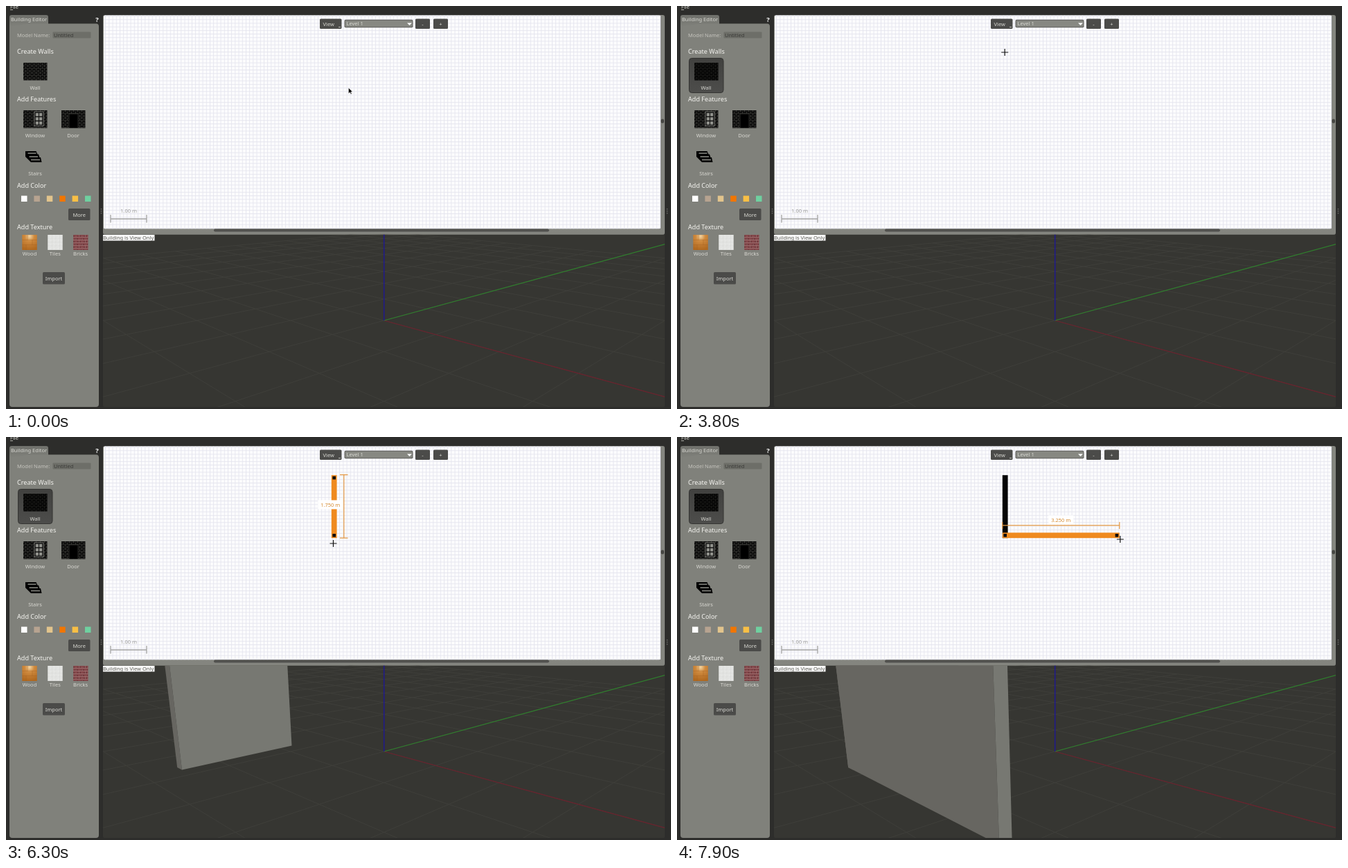
Write an HTML page that moves like this. It is 960x583 px and loops after 8 s.

```html
<!DOCTYPE html>
<html lang="en">
<head>
<meta charset="utf-8">
<title>Building Editor</title>
<style>
html, body { margin: 0; width: 100%; height: 100%; overflow: hidden; background: #2d2d2b; }
svg { display: block; width: 960px; height: 583px; }
text { font: 7.5px "Noto Sans", "Open Sans", sans-serif; fill: #d9d9d3; }
.head { font-size: 9.1px; fill: #f4f4f0; }
.mid { text-anchor: middle; }
.dim { fill: #d68c33; text-anchor: middle; }
.dimline { stroke: #e59a45; stroke-width: 1.2; fill: none; }
</style>
</head>
<body>
<svg viewBox="0 0 960 583">
  <defs>
    <pattern id="brick" width="6" height="5" patternUnits="userSpaceOnUse">
      <rect width="6" height="5"/>
      <path d="M0 .5H6M0 3H6M1.5 .5V3M4.5 3V5" stroke="#50514c" stroke-width=".6"/>
    </pattern>
    <pattern id="redbrick" width="9" height="8" patternUnits="userSpaceOnUse">
      <rect width="9" height="8" fill="#85494c"/>
      <path d="M0 1H5M4 5H9" stroke="#6a363b" stroke-width="1.600"/>
      <path d="M0 2.500H9M0 6.500H9M2 0V2.500M6.500 2.500V6.500" stroke="#a47c7a" stroke-width=".6"/>
    </pattern>
    <pattern id="tile" width="5.5" height="5.5" patternUnits="userSpaceOnUse">
      <rect width="6" height="6" fill="#e6e7e5"/>
      <path d="M0 .5H6M.5 0V6M2 4L4 2" stroke="#d5d7d4" stroke-width=".6"/>
    </pattern>
    <pattern id="grid" x="543.6" y="14.1" width="5.2" height="5.2" patternUnits="userSpaceOnUse">
      <path d="M0 .5H5.2M.5 0V5.2" stroke="#e3e3ee" stroke-width=".85"/>
    </pattern>
    <radialGradient id="wood" cx=".5" cy=".1" r=".9">
      <stop offset="0" stop-color="#f3d5a2"/><stop offset=".35" stop-color="#cf8a3e"/><stop offset="1" stop-color="#b0681f"/>
    </radialGradient>
    <linearGradient id="press" x2="0" y2="1">
      <stop offset="0" stop-color="#41413f"/><stop offset="1" stop-color="#4d4d4b"/>
    </linearGradient>
    <linearGradient id="tab" x2="0" y2="1">
      <stop offset="0" stop-color="#6f706b"/><stop offset="1" stop-color="#80817b"/>
    </linearGradient>
    <clipPath id="view"><rect x="140" y="330.700" width="811" height="249.300" rx="2"/></clipPath>
  </defs>

  <rect width="960" height="583" fill="#2d2d2b"/>
  <text x="6" y="4">File</text>
  <path d="M6 5.5H10" stroke="#d9d9d3" stroke-width=".7"/>

  <!-- side panel -->
  <rect x="5" y="25.500" width="129" height="554.500" rx="4" fill="#80817b"/>
  <path d="M5 30V16Q5 13 8 13H58Q61 13 61 16V26H30Z" fill="url(#tab)"/>
  <text x="7" y="22">Building Editor</text>
  <text x="131.5" y="22.5" class="mid" style="font-weight:700;font-size:9.5px;fill:#fff">?</text>
  <text x="16" y="45" style="fill:#c5c5be">Model Name:</text>
  <rect x="67.500" y="37.500" width="55" height="9" rx="1" fill="#6d6e68"/>
  <text x="69" y="45" style="fill:#3a3a37">Untitled</text>
  <rect id="pressed" x="17.500" y="75.500" width="49.500" height="50" rx="4" fill="url(#press)" stroke="#353533"/>
  <rect x="25" y="82" width="34.500" height="25.500" fill="url(#brick)"/>
  <rect id="shade" x="25" y="82" width="34.500" height="25.500" opacity=".5"/>
  <rect x="25" y="151" width="34.500" height="25.500" fill="url(#brick)"/>
  <rect x="80" y="151" width="34.500" height="25.500" fill="url(#brick)"/>
  <g id="window"></g>
  <path d="M91 176.500V156H104V176.500Z" stroke="#4c4d49" stroke-width=".5"/>
  <path d="M28 210H43.500L45.500 214.500H47L48.500 219H50L51.500 226H36L28 218Z"/>
  <path d="M31.500 213H43.500M33.500 218H46M36 222.500H49" stroke="#8c8d86" stroke-width="1.400"/>
  <g id="labels"></g>

  <!-- splitter grips -->
  <path d="M137.500 293V302M954.500 293V302" stroke="#6b6b67" stroke-width="1.500" stroke-dasharray="1.500 1.500"/>

  <!-- plan view -->
  <rect x="140" y="13" width="811" height="318" rx="3" fill="#84857f"/>
  <rect x="141" y="13.500" width="804" height="308.800" rx="2" fill="#fcfcfd"/>
  <rect x="141" y="13.500" width="804" height="308.800" rx="2" fill="url(#grid)"/>
  <rect x="300" y="322.500" width="484" height="4" rx="2" fill="#51514e"/>
  <rect x="945.500" y="163.500" width="4.500" height="6" rx="2" fill="#464643"/>
  <path d="M151 302V313.500M203 302V313.500M151 308H203" stroke="#a2a2a2" stroke-width="1.300"/>
  <text x="177" y="299" class="mid" style="fill:#9c9c9c">1.00 m</text>
  <g id="plan"></g>
  <g id="bar"></g>

  <!-- 3D view -->
  <g clip-path="url(#view)">
    <rect x="140" y="330" width="811" height="250" fill="#363632"/>
    <path id="floor" fill="none" stroke="#40403c" stroke-width=".9"/>
    <g id="axes"></g>
    <g id="solid"></g>
  </g>
  <rect x="140" y="331" width="74.500" height="8.500" fill="#fbfbfb"/>
  <text x="140" y="338" style="fill:#5b5b55">Building is View Only</text>

  <path id="arrow" d="M0 0V8L2 6.300L3.400 9L4.600 8.400L3.300 5.800L5.600 5.600Z" stroke="#fff" stroke-width=".4"/>
  <path id="cross" d="M-5 0H5M0 -5V5" stroke="#111" stroke-width="1.200"/>
</svg>

<script>
const $ = id => document.getElementById(id);
const rect = (x, y, w, h, fill, rx = 0) =>
  `<rect x="${x}" y="${y}" width="${w}" height="${h}" fill="${fill}" rx="${rx}"/>`;
const text = (x, y, s, cls = 'mid') => `<text x="${x}" y="${y}" class="${cls}">${s}</text>`;
const button = (x, y, w, h, s, dx = 0) =>
  rect(x, y, w, h, '#4b4b49', 1.5) + text(x + w / 2 + dx, y + h / 2 + 3, s);

// Side panel contents
const heads = { 'Create Walls': 69, 'Add Features': 138, 'Add Color': 262.5, 'Add Texture': 323 };
const swatches = ['#ffffff', '#b7a390', '#e2c48c', '#f27600', '#f8bf45', '#6fd0a0'];
const fills = { Wood: 'wood', Tiles: 'tile', Bricks: 'redbrick' };
$('labels').innerHTML =
  Object.entries(heads).map(([s, y]) => text(16, y, s, 'head')).join('') +
  text(42, 120.5, 'Wall') + text(42, 190, 'Window') + text(97, 190, 'Door') + text(42, 245, 'Stairs') +
  swatches.map((c, i) => rect(22 + i * 18.4, 274.5, 8.5, 8.5, c)).join('') +
  Object.entries(fills).map(([s, id], i) =>
    rect(23.3 + i * 36.9, 331, 21.5, 22, `url(#${id})`) + text(34 + i * 36.8, 360.5, s)).join('') +
  '<path d="M23.300 338.500H44.800M23.300 345.500H44.800M31 331V338.500M38 338.500V345.500M29 345.500V353" stroke="#9a571b" stroke-opacity=".6" stroke-width=".5"/>' +
  button(90, 293, 31.5, 17, 'More') + button(53, 385, 32, 17.5, 'Import');

let panes = rect(40.5, 152.5, 14, 21.5, '#8f908a') + rect(41.3, 153.3, 12.4, 19.9, '#0c0c0c');
for (let i = 0; i < 6; i++)
  panes += rect(42.7 + i % 2 * 5.3, 154.8 + Math.floor(i / 2) * 6.1, 4.3, 4.7, '#8f908a');
$('window').innerHTML = panes;

// Plan toolbar
$('bar').innerHTML = button(453, 18.5, 31.5, 14.5, 'View', -3) +
  '<path d="M480 30.500H483" stroke="#c8c8c2" stroke-width=".9"/>' +
  rect(488.5, 19.8, 99, 11.4, '#5d5d5a', 2) + rect(489.5, 20.8, 97, 9.4, '#878882', 1) +
  text(491.5, 28.3, 'Level 1', '') + '<path d="M579 24.500H586L582.500 28Z" fill="#fff"/>' +
  button(591, 18.5, 21, 14.5, '-') + button(617, 18.5, 21, 14.5, '+');

// Camera at (5, -5, 2) aimed at the world origin
const depth = (x, y, z) => 7.348 + (y - x) * Math.SQRT1_2 * .9622 - z * .2722;
const project = (x, y, z = 0) => {
  const s = (x + y) * Math.SQRT1_2, up = (y - x) * Math.SQRT1_2 * .2722 + z * .9622;
  const k = 702 / depth(x, y, z);
  return [(545.7 + s * k).toFixed(1), (455 - up * k).toFixed(1)];
};
const seg = (a, b) => `M${project(...a)}L${project(...b)}`;

let floor = '';
for (let i = -10; i <= 10; i++)
  for (let j = -10; j < 10; j++) {
    if (depth(i, j, 0) > 1) floor += seg([i, j], [i, j + 1]);
    if (depth(j + 1, i, 0) > 1) floor += seg([j, i], [j + 1, i]);
  }
$('floor').setAttribute('d', floor);
const axis = (end, color, width) =>
  `<path d="${seg([0, 0], end)}" stroke="${color}" stroke-width="${width}"/>`;
$('axes').innerHTML =
  axis([4.5, 0], '#6c212d', 1.1) + axis([0, 20], '#2f7f2d', 1.1) + axis([0, 0, 2], '#1f1a8c', 1.5);

// Walls, in plan pixels
const M = 52, T = 7.8, X = 469.8, Y = 55.2, H = 2.5;
const world = (x, y) => [(x - 543.6) / M, (14.1 - y) / M];
const face = (a, b, fill) =>
  `<path d="M${project(...a)}L${project(...b)}L${project(...b, H)}L${project(...a, H)}Z" fill="${fill}"/>`;
const block = (x, y, w, h, side) => {
  const near = world(x + w, y + h);
  return face(world(x, y + h), near, '#676661') + face(near, world(x + w, y), side);
};
const handle = (x, y) => rect(x - 2.3, y - 2.3, 4.6, 4.6, '#0c0c0c');
const wallLength = d => Math.max(.15, .25 * Math.floor(d / 13 + .62));
const label = (x, y, len) => rect(x - 18, y - 6.5, 36, 13, '#fff') + text(x, y + 2.7, len.toFixed(3) + ' m', 'dim');

function activeWall(x, y, len, down) {
  const px = len * M, w = down ? T : px, h = down ? px : T, c = T / 2;
  const wall = rect(x, y, w, h, '#ef8a1f') + handle(x + c, y + c) + handle(x + w - c, y + h - c);
  const line = down
    ? `M482 ${y - .5}H493.500M482 ${y + h}H493.500M487.800 ${y - .5}V${y + h}`
    : `M${x} ${y - 15.5}V${y - 5.5}M${x + w} ${y - 15.5}V${y - 5.5}M${x} ${y - 10.5}H${x + w}`;
  return wall + `<path d="${line}" class="dimline"/>` +
    (down ? label(468.3, y + h / 2 - 2.8, len) : label(x + w / 2, y - 18.5, len));
}

// Pointer moves: start ms, number of 100 ms steps, end x, end y
const moves = [
  [400, 2, 312.5, 143.5], [700, 3, 117.5, 93.5], [1100, 3, 53, 101],
  [2100, 3, 204, 118.5], [2400, 1, 262, 120], [2500, 5, 488, 94.5],
  [3000, 6, 470, 72], [3700, 2, 473.2, 67], [4300, 3, 473.2, 59],
  [5100, 4, 473, 95.5], [5500, 5, 473, 130], [6000, 4, 472.5, 154],
  [6800, 3, 571, 147], [7100, 1, 567, 144], [7300, 1, 570.2, 142.5],
  [7400, 3, 631, 145], [7800, 2, 639.8, 148]
];
function pointer(t) {
  let x = 494.5, y = 118.5;
  for (const [start, n, tx, ty] of moves) {
    const k = Math.min(n, Math.max(0, Math.floor((t - start) / 100) + 1)) / n;
    x += (tx - x) * k;
    y += (ty - y) * k;
  }
  return [x, y];
}

function draw(t) {
  const [x, y] = pointer(t), drawing = t >= 1800;
  for (const [id, on] of [['arrow', !drawing], ['cross', drawing]]) {
    $(id).setAttribute('transform', `translate(${x} ${y})`);
    $(id).style.display = on ? '' : 'none';
  }
  for (const id of ['pressed', 'shade']) $(id).style.display = t >= 1300 ? '' : 'none';

  let plan = '', solid = '';
  if (t >= 6800) {
    const len = wallLength(x - 473), h = 1.75 * M, y2 = Y + h - T;
    plan = rect(X, Y, T, h, '#050505') + activeWall(X, y2, len, false);
    solid = block(X, Y, T, h, '#5a5a56') + block(X, y2, len * M, T, '#777872');
  } else if (t >= 4800) {
    const len = wallLength(y - 59);
    plan = activeWall(X, Y, len, len > .15);
    solid = block(X, Y, T, len * M, '#777872');
  }
  $('plan').innerHTML = plan;
  $('solid').innerHTML = solid;
}

const begin = performance.now();
let last = -1;
function tick() {
  const t = Math.floor((performance.now() - begin) % 8000 / 100) * 100;
  if (t !== last) draw(last = t);
  requestAnimationFrame(tick);
}
tick();
</script>
</body>
</html>
```
